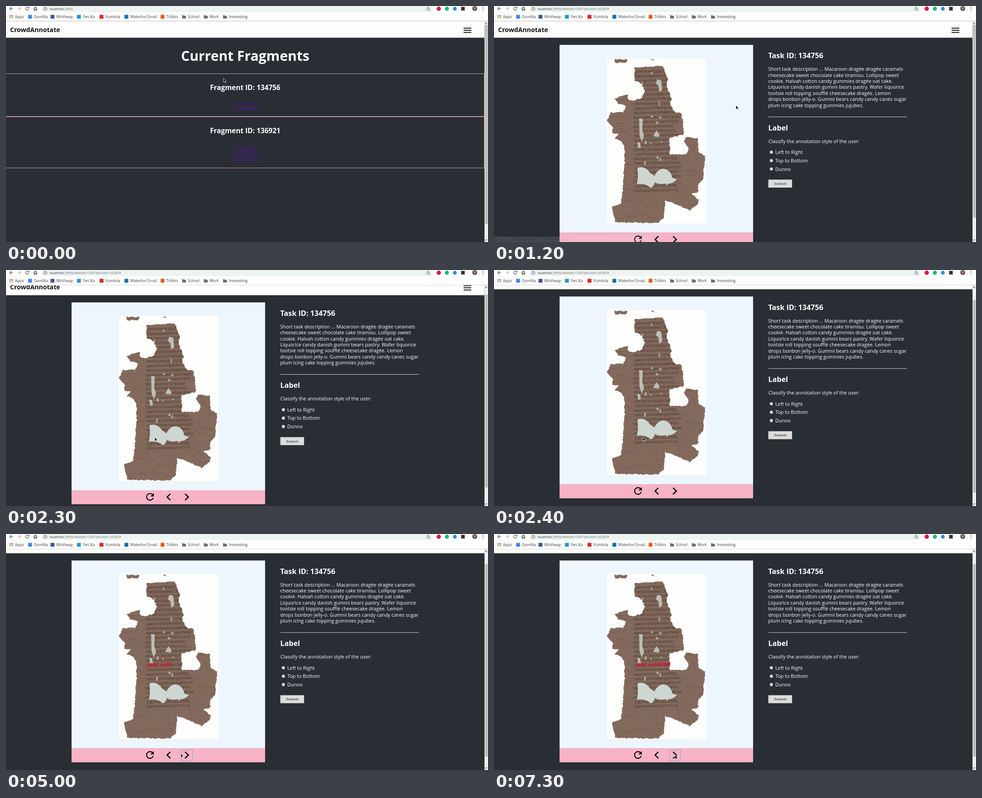
Animation of 1066 by 525 pixels, one loop 8000 ms. Source, as an HTML page:

```html
<!DOCTYPE html>
<html lang="en">
<head>
<meta charset="utf-8">
<title>CrowdAnnotate</title>
<style>
html, body { margin: 0; height: 100%; overflow: hidden; background: #292d34; }
svg { display: block; width: 1066px; height: 525px; font-family: 'Open Sans', 'Noto Sans', sans-serif; }
text { white-space: pre; }
.mid { text-anchor: middle; }
.h1 { font: bold 30.1px 'Open Sans', sans-serif; }
.h2 { font: bold 16.2px 'Open Sans', sans-serif; }
.h3 { font: bold 15.4px 'Open Sans', sans-serif; }
.link { font-size: 15.45px; fill: #551a8b; text-decoration: underline; }
.body { font-size: 10.8px; font-weight: 500; }
.marks { font-size: 8.4px; font-weight: 500; fill: #3c4043; }
.ink { font: 7.6px 'Noto Sans', sans-serif; fill: #3d2e28; opacity: .85; }
.red { font: bold 11px 'Noto Sans', sans-serif; fill: #dc1230; }
</style>
</head>
<body>
<svg viewBox="0 0 1066 525">
  <defs><clipPath id="sheet"><path id="sheetEdge"/></clipPath></defs>
  <rect width="1066" height="525" fill="#292d34"/>

  <g id="page">
    <rect y="34" width="1058" height="36.5" fill="#fefefe"/>
    <text x="9" y="57.7" font-size="14.1" font-weight="bold" fill="#111">CrowdAnnotate</text>
    <path d="M1012 49.2h17M1012 54h17M1012 58.8h17" stroke="#111" stroke-width="2"/>

    <g id="list" fill="#fff">
      <text class="h1 mid" x="529" y="122.3">Current Fragments</text>
      <path d="M0 150.5H1057.6V245.6H0M0 246.5H1057.6V360.3H0" fill="none" stroke="#e9a9b6" stroke-width=".9"/>
      <text class="h3 mid" x="529" y="186.8">Fragment ID: 134756</text>
      <text class="link mid" x="529.5" y="227.5">162839</text>
      <text class="h3 mid" x="529" y="283.4">Fragment ID: 136921</text>
      <text class="link mid" x="529.5" y="323.3">164207</text>
      <text class="link mid" x="529.5" y="341.2">1085391</text>
    </g>

    <g id="task">
      <rect x="145" y="86.5" width="428" height="418" fill="#edf6fc"/>
      <rect x="250" y="117.3" width="218.6" height="366.7" fill="#fefefd"/>
      <path id="papyrus" fill="#836a5c"/>
      <g clip-path="url(#sheet)">
        <path id="fibres" fill="none" stroke="#54413a" stroke-width=".6" opacity=".35"/>
        <g id="script"></g>
        <g id="holes" fill="#ced6d1">
          <path d="M317 360Q334 354 345 371L355 378Q362 362 376 362Q392 366 394 382L405 386Q392 398 378 395Q364 398 356 392Q352 404 346 404Q336 394 316 396Q320 378 317 360Z"/>
          <path d="M321 250l8 1-1 26 4 12-5 13-5-13ZM361 163l9 2 2 22-7 4-1-13-6-6ZM352 290l7-13 7 9-1 5ZM317 303l6 1 2 10-6 3Z" opacity=".8"/>
        </g>
      </g>
      <rect x="145" y="504.3" width="428" height="31.2" fill="#f7b3c5"/>
      <rect id="focus" y="507.8" width="24.5" height="25" fill="none" stroke="#8aa9c6"/>
      <path transform="translate(305.7 506.4) scale(1.06)" d="M17.65 6.35C16.2 4.9 14.21 4 12 4c-4.42 0-8 3.58-8 8s3.58 8 8 8c3.73 0 6.84-2.55 7.73-6h-2.08c-.82 2.33-3.04 4-5.65 4-3.31 0-6-2.69-6-6s2.69-6 6-6c1.66 0 3.14.69 4.22 1.78L13 11h7V4z"/>
      <path d="M363.5 512.2l-7.2 7.2 7.2 7.2M396 512.2l7.2 7.2-7.2 7.2" fill="none" stroke="#000" stroke-width="2.6"/>
      <g id="reds"></g>

      <g fill="#fff">
        <text class="h2" x="606.5" y="116.3">Task ID: 134756</text>
        <g id="blurb"></g>
        <path d="M607 246.7H913" stroke="#d4d5d6"/>
        <text class="h2" x="606.5" y="276.6">Label</text>
        <text class="body" x="607" y="304.9">Classify the annotation style of the user:</text>
        <g id="options"></g>
      </g>
      <rect x="606.7" y="386.2" width="52.5" height="17.8" fill="#dcdcdc"/>
      <text class="mid" x="633" y="398" fill="#555" style="font:bold 8px 'Liberation Sans',sans-serif">Submit</text>
    </g>
  </g>

  <g id="scrollbar">
    <rect x="1058.3" y="34" width="8" height="491" fill="#f1f1f1"/>
    <rect id="thumb" x="1059.5" width="6" fill="#bcbcbc"/>
    <path d="M1060 39.8l2.2-3 2.2 3ZM1060 519.5l2.2 3 2.2-3Z" fill="#505050"/>
  </g>

  <g id="status">
    <path d="M0 513.5H351Q354 513.5 354 516.5V525H0Z" fill="#dee1e6"/>
    <text x="1" y="522.3" font-size="8.1" fill="#5f6368">localhost:3000/labeller/134756/user/162839</text>
  </g>

  <g id="browser">
    <rect width="1066" height="33.5" fill="#fefefe"/>
    <path d="M0 33.6H1066" stroke="#cfcfcf" stroke-width=".8"/>
    <path d="M78 0H944V7Q944 13.5 937.5 13.5H84.5Q78 13.5 78 7Z" fill="#edf3f0"/>
    <g fill="none" stroke="#50545a" stroke-width="1.2">
      <path d="M15.8 5.8H8.4M11.9 2.2L8.3 5.8l3.6 3.6"/>
      <path d="M25.5 5.8h7.4M29.4 2.2L33 5.8l-3.6 3.6" stroke="#bbb"/>
      <path d="M50 3.7A3.5 3.5 0 1 0 50.5 6.8M50.7 1.8V4.5H47.8"/>
      <path d="M60.8 6.2L65 2.2l4.2 4M62.2 5.5V9.8H64V7h2v2.8h1.8V5.5"/>
      <circle cx="87" cy="6" r="3.5" stroke-width=".9"/>
      <path d="M87 5.5V8M87 3.8v.9" stroke-width=".9"/>
      <path d="M934 2.2l1.1 2.7 2.9.2-2.2 1.9.7 2.8L934 8.3l-2.5 1.5.7-2.8-2.2-1.9 2.9-.2Z" stroke-width=".8"/>
    </g>
    <text x="96" y="8.7" font-size="7.7" fill="#303336">localhost<tspan fill="#6c7075">:3000<tspan id="path">/labeller/134756/user/162839</tspan></tspan></text>
    <circle cx="957" cy="6" r="4.7" fill="#d8182e"/>
    <circle cx="975" cy="6" r="4.5" fill="#18b878"/>
    <circle cx="992.5" cy="6" r="4.2" fill="#2f8de0"/>
    <rect x="1006.5" y="2" width="8" height="8" fill="#333"/>
    <circle cx="1036.7" cy="5.7" r="5.6" fill="#795c57"/>
    <text class="mid" x="1036.7" y="8.3" font-size="7" fill="#fff">Y</text>
    <path d="M1054.5 2.7v6.5" stroke="#555" stroke-width="1.8" stroke-linecap="round" stroke-dasharray="0 3.2"/>
    <g stroke-width="2" stroke-dasharray="2 1">
      <path d="M7.5 21h8" stroke="#e04a3f"/><path d="M7.5 24h8" stroke="#4a9a58"/><path d="M7.5 27h8" stroke="#e2a33b"/>
    </g>
    <g id="marks" class="marks"></g>
  </g>

  <g id="cursor" stroke="#fff" stroke-width=".8" stroke-linejoin="round">
    <path id="arrow" d="M0 0V8.8L2 7l1.4 3 1.4-.6-1.3-2.9H6.2Z"/>
    <path id="hand" d="M-.9 1Q0-.6 .9 1V4L4.4 4.8Q5.3 5.2 5 7L4.2 9.8H-.2L-3 6.2Q-2.6 4.8-.9 6.2Z" fill="#222"/>
  </g>
</svg>

<script>
const $ = id => document.getElementById(id);
const NS = 'http://www.w3.org/2000/svg';
function add(parent, tag, attrs, text = '') {
  const el = document.createElementNS(NS, tag);
  for (const k in attrs) el.setAttribute(k, attrs[k]);
  el.textContent = text;
  return parent.appendChild(el);
}
let seed = 7;
const rnd = (a = 0, b = 1) => a + (b - a) * (seed = seed * 16807 % 2147483647) / 2147483647;

// Bookmarks: label, text x, colour of a plain mark (folders have none)
[['Apps', 20, 'none'], ['Gombla', 62, '#4285f4'], ['Mirthway', 111.5, '#3b5998'],
 ['Fen.Ka', 170, '#2196e3'], ['Vumtola', 220, '#e8211d'], ['Waterloo Email', 275, '#0f6fc0'],
 ['Tribbo', 355, '#f4511e'], ['School', 402], ['Work', 450], ['Interesting', 492.5]
].forEach(([label, x, fill]) => {
  add($('marks'), 'text', {x, y: 26.8}, label);
  if (fill) add($('marks'), 'rect', {x: x - 13, y: 19.7, width: 8.5, height: 8.5, fill});
  else add($('marks'), 'path', {d: `M${x - 12.5} 20.5h3l1 1.2h4.5v6h-8.5Z`, fill: '#686c70'});
});

`Short task description ... Macaroon dragée dragée caramels
cheesecake sweet chocolate cake tiramisu. Lollipop sweet
cookie. Halvah cotton candy gummies dragée oat cake.
Liquorice candy danish gummi bears pastry. Wafer liquorice
tootsie roll topping soufflé cheesecake dragée. Lemon
drops bonbon jelly-o. Gummi bears candy candy canes sugar
plum icing cake topping gummies jujubes.`.split('\n').forEach((line, i) =>
  add($('blurb'), 'text', {class: 'body', x: 606.5, y: 144.4 + 13.35 * i}, line));

['Left to Right', 'Top to Bottom', 'Dunno'].forEach((label, i) => {
  const y = 325.2 + 18.7 * i;
  add($('options'), 'circle', {cx: 613.4, cy: y, r: 3.4, fill: '#e2e2e2', stroke: '#999', 'stroke-width': .6});
  add($('options'), 'text', {class: 'body', x: 622, y: y + 4}, label);
});

// Papyrus: a few corners joined by randomly torn edges
function torn(corners) {
  const pts = corners.split(' ').map(p => p.split(',').map(Number));
  return 'M' + pts.flatMap(([x, y], i) => {
    const [u, v] = pts[(i + 1) % pts.length];
    const n = Math.ceil(Math.hypot(u - x, v - y) / 3);
    return Array.from({length: n}, (_, k) =>
      [x + (u - x) * k / n + rnd(-1.3, 1.3), y + (v - y) * k / n + rnd(-1.3, 1.3)].join(' '));
  }).join('L') + 'Z';
}
const edge = torn('311,137 373,133 384,162 381,175 392,205 390,222 402,236 415,238 420,285 388,294 ' +
  '389,330 426,330 431,316 420,302 425,290 450,295 452,325 467,334 462,385 452,395 451,415 438,418 ' +
  '453,432 450,443 432,455 404,441 379,433 375,472 362,483 268,481 261,447 282,438 289,345 ' +
  '288,310 281,300 266,294 275,285 262,283 262,268 250,255 259,237 287,236 291,222 275,217 ' +
  '267,206 283,199 297,197 296,207 309,212 328,203 333,190 327,173 310,165');
$('sheetEdge').setAttribute('d', edge);
$('papyrus').setAttribute('d', edge + torn('266,119 295,119 292,126 267,126') + torn('347,119 354,118 356,123'));

let fibres = '';
for (let i = 0; i < 700; i++)
  fibres += `M${rnd(250, 465)} ${rnd(130, 480)}` + (rnd() < .7 ? 'h' + rnd(5, 23) : 'v' + rnd(3, 13));
$('fibres').setAttribute('d', fibres);

for (let i = 0; i < 16; i++)
  add($('holes'), 'ellipse', {cx: rnd(320, 390), cy: rnd(140, 470), rx: rnd(1, 3), ry: rnd(2, 6), opacity: .6});

const greek = 'ΑΒΓΔΕΗΘΙΚΛΜΝΟΠΡϹΤΥΧΩ';
for (let y = 148; y < 420; y += 10.2) {
  const row = Array.from({length: 20}, () => greek[Math.floor(rnd(0, greek.length))]).join('');
  add($('script'), 'text', {class: 'ink', x: rnd(307, 312), y, transform: `rotate(-1.5 360 ${y})`}, row);
}

// Red letters appear and vanish one by one with the two arrow buttons
const reds = [...'XNCIΛΛMΠOME'].map((glyph, i) =>
  add($('reds'), 'text', {class: 'red', x: 312 + 7.15 * i, y: 323.3 - i * .2}, glyph));
const nextClicks = [3200, 3800, 4200, 4300, 4500, 4600, 5000, 6500, 6600, 6900, 6900, 7200, 7300];
const backClicks = [5500, 5700];

// Pointer glides: start, end, x, y
const glides = [[300, 400, 601, 261], [600, 1000, 535, 221], [1500, 1700, 246, 470], [2000, 2100, 329, 372],
  [2700, 2900, 421, 509], [3100, 3200, 400, 488], [5000, 5200, 359.5, 488.5], [6400, 6600, 400.5, 490]];

const clamp = v => Math.max(0, Math.min(1, v));
const count = (times, t) => times.filter(s => s <= t).length;
const show = (el, on) => el.style.display = on ? '' : 'none';

function pointer(t) {
  let x = 481, y = 161;
  for (const [from, to, u, v] of glides) {
    const p = clamp((t - from + 100) / (to - from + 100));
    x += (u - x) * p;
    y += (v - y) * p;
  }
  return [x, y];
}

function draw() {
  // The screen refreshes ten times a second
  const t = Math.floor(performance.now() % 8000 / 100) * 100;
  const task = t >= 1200;
  const scroll = Math.min(27.6, 14.4 * clamp((t - 2200) / 200) * 2);
  const [x, y] = pointer(t);
  const near = (cx, cy, w, h) => Math.abs(x - cx) < w && Math.abs(y - cy) < h;
  const hand = task ? near(359.5, 492, 12, 12) || near(400, 492, 12, 12) : near(529, 222, 27, 9);

  show($('list'), !task);
  show($('task'), task);
  show($('path'), t >= 1100);
  $('page').setAttribute('transform', `translate(0 ${-scroll})`);
  $('thumb').setAttribute('y', 42 + scroll * .88);
  $('thumb').setAttribute('height', task ? 429 : 443);
  $('status').setAttribute('opacity', t < 900 || t > 1200 ? 0 : Math.min(1, .4 ** ((t - 1000) / 100)));
  show($('focus'), t >= 3200);
  $('focus').setAttribute('x', t >= 5400 && t < 6500 ? 347 : 388);
  $('cursor').setAttribute('transform', `translate(${x} ${y})`);
  show($('hand'), hand);
  show($('arrow'), !hand);
  const shown = count(nextClicks, t) - count(backClicks, t);
  reds.forEach((el, i) => show(el, i < shown));
  requestAnimationFrame(draw);
}
draw();
</script>
</body>
</html>
```
